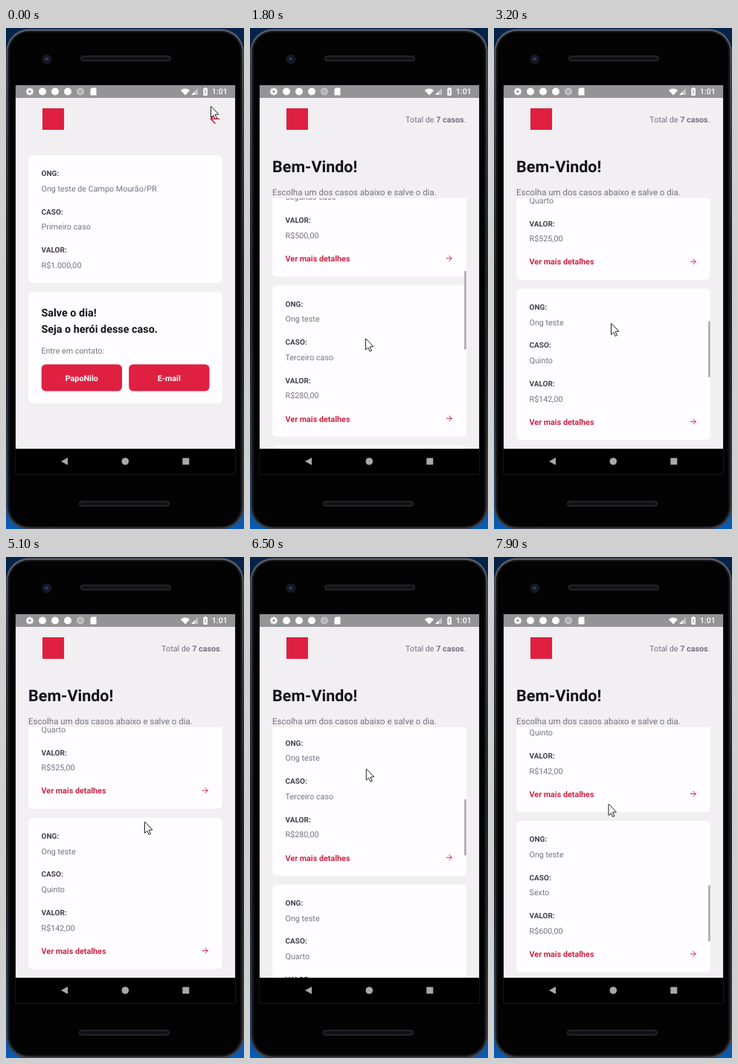
Animation of 320 by 674 pixels, one loop 8 s. Source, as an HTML page with a canvas:

```html
<!DOCTYPE html>
<html lang="pt-BR">
<head>
<meta charset="utf-8">
<title>Casos</title>
<style>
html, body { margin: 0; width: 100%; height: 100%; overflow: hidden; background: #000; }
canvas { display: block; width: 320px; height: 674px; }
</style>
</head>
<body>
<canvas id="stage"></canvas>
<script>
const W = 320, H = 674, LOOP = 8000, STEP = 100;
const RED = '#e02041', LINK = '#cc2446', INK = '#13131a', LABEL = '#41414d', GREY = '#737380';
const PAGE = '#f1eff2', CARD = '#fffdff';
const BODY = 10.77; // 15dp on the scaled screen
const LIST = { top: 229, bottom: 566, pitch: 215.4, card: 203.5 };
const CASES = [
  ['Primeiro caso', '1.000'], ['Segundo caso', '500'], ['Terceiro caso', '280'],
  ['Quarto', '525'], ['Quinto', '142'], ['Sexto', '600'], ['Sétimo', '350']
];

// A swipe drags the pointer to one height, then lets it go back to rest while the list settles
const DRAG = 300, SETTLE = 600, BAR_HOLD = 1900, BAR_FADE = 250;
const swipe = (at, x, to, rest, scroll) => ({ at, x, to, rest, scroll });
const SWIPES = [
  swipe(1200, 155, 205, 417.5, 313.5),
  swipe(1900, 157, 197, 397, 740),
  swipe(5600, 161, 462, 470, 415),
  swipe(6400, 153, 184, 416, 678.5),
  swipe(7200, 153.5, 133, 332, 951)
];
const stop = (t, x, y) => ({ t, x, y });
const PATH = [
  stop(0, 275, 105), stop(900, 275, 108), stop(1200, 164, 458),
  stop(3700, 157, 397), stop(4450, 135, 514), stop(5100, 186, 356), stop(5600, 161, 345),
  ...SWIPES.flatMap(s => [stop(s.at + DRAG, s.x, s.to), stop(s.at + SETTLE, s.x, s.rest)])
].sort((a, b) => a.t - b.t);

const canvas = document.getElementById('stage');
const ctx = canvas.getContext('2d');
const dpr = window.devicePixelRatio || 1;
canvas.width = W * dpr;
canvas.height = H * dpr;

const clamp = v => Math.min(1, Math.max(0, v));
const ease = v => { const p = clamp(v); return p * p * (3 - 2 * p); };
const mix = (a, b, p) => a + (b - a) * p;

function pointerAt(t) {
  const next = PATH.findIndex(p => p.t > t);
  if (next < 0) return PATH[PATH.length - 1];
  const a = PATH[next - 1], b = PATH[next];
  const p = ease((t - a.t) / (b.t - a.t));
  return { x: mix(a.x, b.x, p), y: mix(a.y, b.y, p) };
}

const scrollAt = t => SWIPES.reduce((pos, s) => mix(pos, s.scroll, ease((t - s.at) / SETTLE)), 0);

function barAlpha(t) {
  const last = SWIPES.filter(s => s.at <= t).pop();
  return last ? 1 - clamp((t - last.at - BAR_HOLD) / BAR_FADE) : 0;
}

function box(x, y, w, h, r, fill) {
  ctx.beginPath();
  ctx.roundRect(x, y, w, h, r);
  ctx.fillStyle = fill;
  ctx.fill();
}

function dot(x, y, r, fill) {
  ctx.beginPath();
  ctx.arc(x, y, r, 0, 7);
  ctx.fillStyle = fill;
  ctx.fill();
}

function poly(points, fill) {
  ctx.beginPath();
  points.forEach(([x, y]) => ctx.lineTo(x, y));
  ctx.closePath();
  ctx.fillStyle = fill;
  ctx.fill();
}

function fade(...colors) {
  const g = ctx.createLinearGradient(0, 0, 0, H);
  colors.forEach((c, i) => g.addColorStop(i / (colors.length - 1), c));
  return g;
}

// y is the middle of the capitals
function text(str, x, y, size, color, weight = 400, align = 'left') {
  ctx.font = `${weight} ${size}px Roboto, sans-serif`;
  ctx.textRendering = 'geometricPrecision';
  ctx.textAlign = align;
  ctx.fillStyle = color;
  ctx.fillText(str, x, y + size * 0.36);
  return ctx.measureText(str).width;
}

function arrow(x, y, r, dir, width, color) {
  ctx.beginPath();
  ctx.moveTo(x - r * dir, y);
  ctx.lineTo(x + r * dir, y);
  ctx.moveTo(x, y - r);
  ctx.lineTo(x + r * dir, y);
  ctx.lineTo(x, y + r);
  ctx.strokeStyle = color;
  ctx.lineWidth = width;
  ctx.lineCap = ctx.lineJoin = 'round';
  ctx.stroke();
}

function card(y, h) {
  box(30.2, y, 260.6, h, 5.7, CARD);
}

function fields(y, ong, [name, value]) {
  Object.entries({ ONG: ong, CASO: name, VALOR: `R$${value},00` }).forEach(([label, str], i) => {
    const top = y + 24.7 + i * 51.5;
    text(label + ':', 47.5, top, 10.05, LABEL, 700);
    text(str, 47.5, top + 20.4, BODY, GREY);
  });
}

function phone() {
  ctx.fillStyle = fade('#06234a', '#040c18', '#050f1f', '#0a5cb4');
  ctx.fillRect(0, 0, W, H);
  box(0.5, 1.5, 319, 673, 30, fade('#5a5d66', '#2a2c31', '#3c3f46'));
  box(2.5, 4, 315, 668, 28, '#141518');
  box(5, 6, 310, 664, 26, '#030303');
  [[100, 37], [98, 636]].forEach(([x, y]) => {
    box(x, y, 122, 8, 4, '#222326');
    box(x + 2, y + 2, 118, 4, 2, '#121214');
  });
  dot(55, 42, 6.5, '#17191f');
  dot(55, 42, 3.8, '#141a33');
  dot(54.5, 41.5, 1.6, '#474a78');
  box(12, 76, 297, 525, 1, '#151515');
}

function navBar() {
  const c = '#a9a9a9';
  ctx.fillStyle = '#000';
  ctx.fillRect(13, 566, 295, 34);
  poly([[74, 583], [83, 578], [83, 588]], c);
  dot(160.3, 583, 4.8, c);
  box(237.3, 578.5, 9, 9, 0.5, c);
}

function statusBar() {
  const bar = '#949395', w = '#fff', y = 85.5;
  ctx.fillStyle = bar;
  ctx.fillRect(13, 77, 295, 17);
  for (let a = 0; a < 2 * Math.PI; a += Math.PI / 4) {
    dot(32 + 4 * Math.cos(a), y + 4 * Math.sin(a), 1.2, w);
  }
  dot(32, y, 4, w);
  dot(32, y, 1.7, bar);
  [49, 66, 83].forEach(x => dot(x, y, 5, w));
  dot(100, y, 5, '#c6c6c8');
  dot(100, y, 3, '#b0b0b2');
  box(113.5, 80.5, 8, 10, [3, 0.5, 0.5, 0.5], w);
  ctx.beginPath();
  ctx.moveTo(241, 90.5);
  ctx.arc(241, 90.5, 9, -Math.PI * 0.74, -Math.PI * 0.26);
  ctx.fillStyle = w;
  ctx.fill();
  poly([[258, 81], [258, 90], [249, 90]], '#c4c4c6');
  poly([[253.5, y], [253.5, 90], [249, 90]], w);
  box(265.3, 81, 5.6, 10, 0.8, w);
  box(267, 80, 2.2, 2, 0, w);
  box(267.5, 83, 1.2, 5.5, 0, bar);
  text('1:01', 276.8, y, 10.6, w, 500);
}

function page() {
  ctx.fillStyle = PAGE;
  ctx.fillRect(13, 94, 295, 472);
  box(49, 108, 29, 29, 0, RED);
}

function total() {
  let x = 290.5;
  [['.', 400], ['7 casos', 700], ['Total de ', 400]].forEach(([str, weight]) => {
    x -= text(str, x, 123.2, BODY, GREY, weight, 'right');
  });
}

function listPage(t) {
  page();
  total();
  text('Bem-Vindo!', 30, 186.7, 21.54, INK, 700);
  text('Escolha um dos casos abaixo e salve o dia.', 30, 220.6, 11.49, GREY);

  const s = scrollAt(t), view = LIST.bottom - LIST.top;
  const shown = t < 2800 ? 5 : 7;
  ctx.save();
  ctx.beginPath();
  ctx.rect(13, LIST.top, 295, view);
  ctx.clip();
  CASES.slice(0, shown).forEach((item, i) => {
    const y = LIST.top + i * LIST.pitch - s;
    card(y, LIST.card);
    fields(y, 'Ong teste', item);
    text('Ver mais detalhes', 47.5, y + 179.4, BODY, LINK, 700);
    arrow(267.8, y + 179, 3.4, 1, 1, LINK);
  });
  ctx.globalAlpha = barAlpha(t);
  const ratio = view / (shown * LIST.pitch);
  ctx.fillStyle = '#b0afb1';
  ctx.fillRect(288, LIST.top + s * ratio, 2.8, view * ratio);
  ctx.restore();
}

function button(x, label) {
  box(x, 452.5, 108.3, 36, 5.7, RED);
  text(label, x + 54.1, 470.8, BODY, '#fff', 700, 'center');
}

function detailPage() {
  page();
  arrow(281, 122.3, 5.8, -1, 1.6, RED);
  card(171, 172);
  fields(171, 'Ong teste de Campo Mourão/PR', CASES[0]);
  card(355, 150);
  text('Salve o dia!', 47.5, 383.3, 14.36, INK, 700);
  text('Seja o herói desse caso.', 47.5, 404.9, 14.36, INK, 700);
  text('Entre em contato:', 47.5, 434.5, BODY, GREY);
  button(47.7, 'PapoNilo');
  button(165.2, 'E-mail');
}

function pointer(t) {
  const { x, y } = pointerAt(t);
  ctx.save();
  ctx.translate(x + 0.5, y + 0.5);
  poly([[0, 0], [0, 15], [3.4, 12], [5.6, 17], [8, 16], [5.6, 11], [10, 10.6]], '#fff');
  ctx.strokeStyle = '#222';
  ctx.lineWidth = 1;
  ctx.lineJoin = 'round';
  ctx.stroke();
  ctx.restore();
}

function draw(t) {
  ctx.setTransform(dpr, 0, 0, dpr, 0, 0);
  phone();
  listPage(t);
  ctx.globalAlpha = 1 - ease((t - 350) / 250);
  if (ctx.globalAlpha > 0) detailPage();
  ctx.globalAlpha = 1;
  statusBar();
  navBar();
  pointer(t);
}

const start = performance.now();
function tick() {
  const t = (performance.now() - start) % LOOP;
  draw(Math.floor(t / STEP) * STEP);
  requestAnimationFrame(tick);
}
tick();
</script>
</body>
</html>
```
